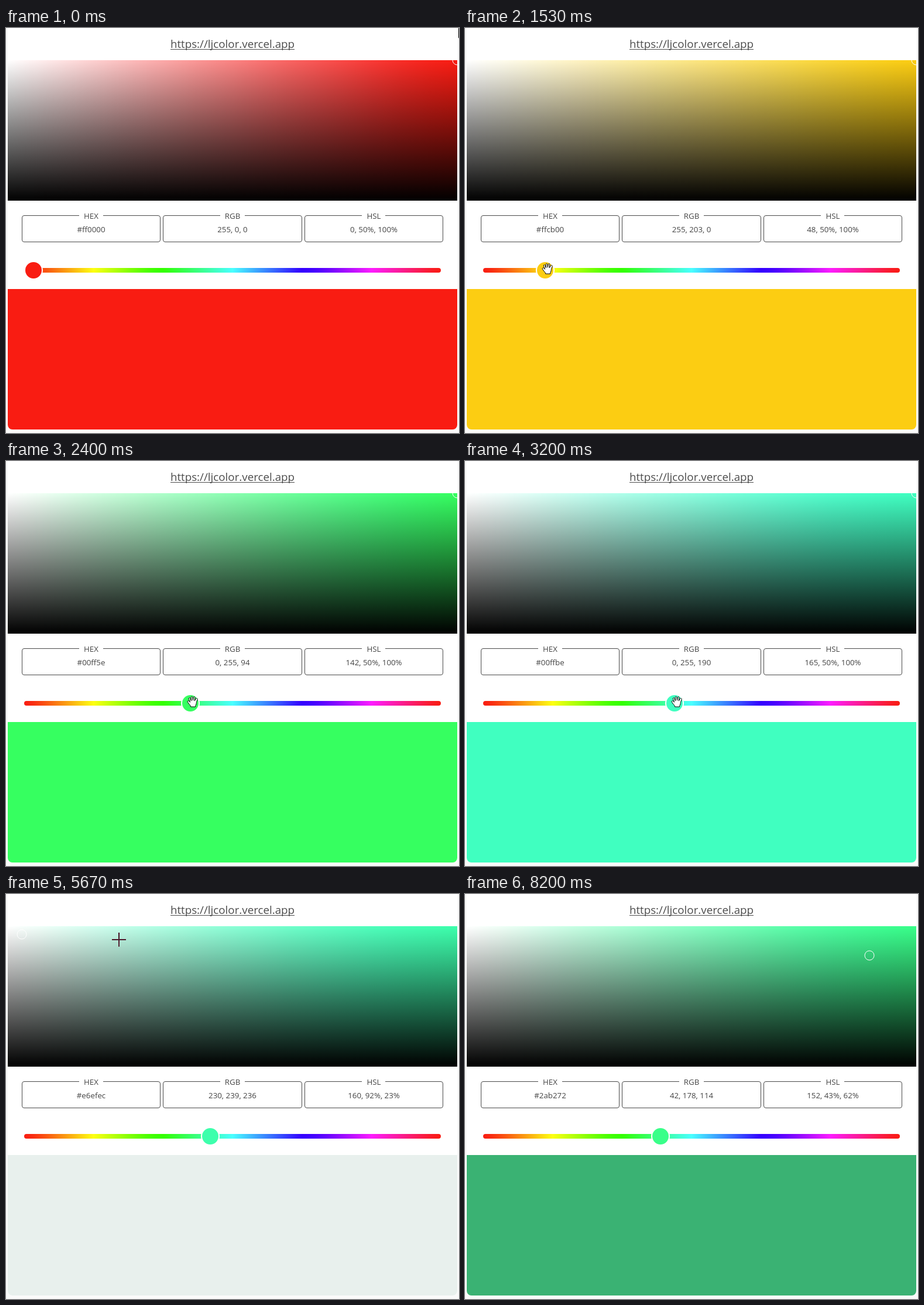
Recreate the animation shown at these times as an HTML page. Size 774 by 692 pixels, loop 9270 ms.

```html
<!DOCTYPE html>
<html lang="en">
<head>
<meta charset="utf-8">
<title>Color picker</title>
<style>
  html, body { margin: 0; width: 100%; height: 100%; overflow: hidden; background: #fafafa; }
  svg { display: block; width: 774px; height: 692px; isolation: isolate; }
  text { font: 13.3px "Open Sans", "Noto Sans", sans-serif; fill: #444; text-anchor: middle; }
  .title { font-size: 18.75px; fill: #4c4c4c; }
  .box { fill: none; stroke: #4a4a4a; }
  .cursor { fill: #fff; stroke: #000; stroke-linejoin: round; }
  #cross { fill: #fff; mix-blend-mode: difference; }
</style>
</head>
<body>
<svg viewBox="0 0 774 692">
  <defs>
    <linearGradient id="sat"></linearGradient>
    <linearGradient id="dark" x2="0" y2="1"><stop stop-opacity="0"/><stop offset="1"/></linearGradient>
    <linearGradient id="rainbow"></linearGradient>
    <clipPath id="area"><rect x="3" y="55" width="768" height="240"/></clipPath>
  </defs>
  <rect width="774" height="692" fill="#fafafa"/>
  <path d="M3 0H771V678a8 8 0 0 1 -8 8H11a8 8 0 0 1 -8 -8Z" fill="#fff"/>
  <text class="title" x="387" y="34">https://ljcolor.vercel.app</text>
  <rect x="281" y="36" width="212" height="1" fill="#4c4c4c"/>
  <rect x="3" y="55" width="768" height="240" fill="url(#sat)"/>
  <rect x="3" y="55" width="768" height="240" fill="url(#dark)"/>
  <g clip-path="url(#area)"><circle id="marker" r="8" fill="none" stroke="#fff"/></g>
  <g id="fields"></g>
  <rect x="31" y="410" width="712" height="8" rx="4" fill="url(#rainbow)"/>
  <circle id="thumb" cy="414" r="15" stroke="#fff" stroke-width="2"/>
  <path id="preview" d="M3 446H771V678a8 8 0 0 1 -8 8H11a8 8 0 0 1 -8 -8Z"/>
  <path id="cross" d="M-1 -12H1V-1H12V1H1V12H-1V1H-12V-1H-1Z"/>
  <path id="arrow" class="cursor" d="M.5 .5V16.8L4.3 13.2L6.8 18.6L9.2 17.6L6.8 12.2H12Z"/>
  <path id="hand" class="cursor" d="M-3.5 9V7.5C-5 5.5 -7.5 3 -8.8 .5C-9 -1.5 -7 -1.8 -5.5 0L-4.4 1.2L-6.6 -4.8
    C-6.8 -6.8 -4.8 -7 -4.2 -5.4L-2.6 -1.2L-2.8 -7.2C-2.6 -9 -.4 -9 -.2 -7.2L.4 -1.8L1.4 -7.4C2 -9 4 -8.6 3.8 -6.8
    L3.2 -1L5.4 -4.8C6.6 -6.4 8.8 -5.4 8 -3.4L6.4 1.4C6.2 4.2 5.4 6 4.6 7.5V9Z"/>
</svg>
<script>
const LOOP = 9270, STEP = 200 / 3;
const DRAG_START = 1000, DRAG_END = 3500, LEAVE = 8195;

const el = id => document.getElementById(id);
const clamp = v => Math.min(1, Math.max(0, v));
const smooth = p => p * p * (3 - 2 * p);
const thumbX = h => 47 + h * 680 / 360;

// time, hue while the slider is dragged
const hueKeys = [[1000, 0], [1200, 5.9], [1400, 28], [1866, 97], [2400, 142.1], [2860, 161], [3400, 167]];

// start, end, x, y of each free pointer move, before and after the drag
const approach = [[0, 933, 49, 410]];
const moves = [
  [3533, 4400, 68, 94],
  [4467, 4733, 27, 69],
  [5200, 5666, 193, 78],
  [5933, 6266, 360, 86],
  [6533, 6800, 530, 95],
  [7000, 7266, 691, 105],
  [7733, LEAVE, 776, 670]
];

// time, x, y, hue, saturation, value of each click in the area
const picks = [
  [5130, 27, 69, 160, 0.0401, 0.938],
  [5930, 193, 78, 158, 0.22, 0.877],
  [6530, 360, 86, 156, 0.4, 0.824],
  [7000, 530, 95, 154, 0.59, 0.763],
  [7465, 691, 105, 151.8, 0.764, 0.698]
];

function hsvToRgb(h, s, v) {
  return [5, 3, 1].map(n => {
    const k = (n + h / 60) % 6;
    return 255 * v * (1 - s * clamp(Math.min(k, 4 - k)));
  });
}

// screen colour profile, mixed in linear light
function screenColor(rgb) {
  const [r, g, b] = rgb.map(c => (c /= 255) <= 0.04045 ? c / 12.92 : ((c + 0.055) / 1.055) ** 2.4);
  const mixed = [0.95 * r + 0.033 * g + 0.034 * b, 0.0116 * r + g, 0.006 * r + b * (1 + 0.04 * g * (1 - b))];
  const out = mixed.map(c => {
    c = clamp(c);
    return Math.round(255 * (c <= 0.0031308 ? c * 12.92 : 1.055 * c ** (1 / 2.4) - 0.055));
  });
  return `rgb(${out})`;
}

// the profile bends every blend, so gradients get many stops
function addStops(id, count) {
  el(id).innerHTML = Array.from({ length: count + 1 }, (_, i) => `<stop offset="${i / count}"/>`).join("");
}

function paintStops(id, rgbAt) {
  const stops = el(id).children, last = stops.length - 1;
  for (let i = 0; i <= last; i++) stops[i].setAttribute("stop-color", screenColor(rgbAt(i / last)));
}

function hslText(rgb, h) {
  const max = Math.max(...rgb) / 255, min = Math.min(...rgb) / 255;
  const l = (max + min) / 2;
  const s = (max - min) / (1 - Math.abs(2 * l - 1));
  return `${Math.round(h)}, ${Math.round(l * 100)}%, ${Math.round(s * 100)}%`;
}

function dragHue(t) {
  let [t0, h0] = hueKeys[0];
  for (const [t1, h1] of hueKeys.slice(1)) {
    if (t < t1) return h0 + (h1 - h0) * clamp((t - t0) / (t1 - t0));
    [t0, h0] = [t1, h1];
  }
  return h0;
}

function follow(list, t, x, y) {
  for (const [start, end, toX, toY] of list) {
    const p = smooth(clamp((t - start) / (end - start)));
    x += (toX - x) * p;
    y += (toY - y) * p;
  }
  return [x, y];
}

function pointer(t) {
  if (t < DRAG_START) return follow(approach, t, 773, 0);
  const grip = 2 + 2 * clamp((t - 1200) / 400);
  return follow(moves, t, thumbX(dragHue(t)) + grip, 411);
}

function place(id, x, y, shown) {
  el(id).setAttribute("transform", `translate(${x.toFixed(0)} ${y.toFixed(0)})`);
  el(id).setAttribute("visibility", shown ? "visible" : "hidden");
}

function draw(time) {
  const t = Math.floor((time + 4) / STEP) * STEP;
  let mx = 771, my = 55, h = dragHue(t), s = 1, v = 1;
  for (const p of picks) if (t + 4 >= p[0]) [, mx, my, h, s, v] = p;

  const rgb = hsvToRgb(h, s, v), whole = rgb.map(Math.round);
  paintStops("sat", p => hsvToRgb(h, p, 1));
  el("thumb").setAttribute("fill", screenColor(hsvToRgb(h, 1, 1)));
  el("thumb").setAttribute("cx", thumbX(h).toFixed(0));
  el("preview").setAttribute("fill", screenColor(rgb));
  el("marker").setAttribute("cx", mx);
  el("marker").setAttribute("cy", my);
  el("HEX").textContent = "#" + whole.map(c => c.toString(16).padStart(2, "0")).join("");
  el("RGB").textContent = whole.join(", ");
  el("HSL").textContent = hslText(rgb, h);

  const [x, y] = pointer(t);
  const here = t < LEAVE;
  const inArea = x < 771 && y >= 55 && y < 295;
  const dragging = t >= DRAG_START && t < DRAG_END;
  const onThumb = dragging || Math.hypot(x - thumbX(h), y - 414) < 16;
  place("cross", x, y, here && inArea);
  place("hand", x, y, here && onThumb);
  place("arrow", x, y, here && !inArea && !onThumb);
}

addStops("sat", 16);
addStops("rainbow", 48);
paintStops("rainbow", p => hsvToRgb(p * 360, 1, 1));

el("fields").innerHTML = [["HEX", 27.5, 236, 125, 41], ["RGB", 268.5, 237, 366, 42], ["HSL", 510.5, 236, 608, 40]]
  .map(([name, x, w, gapX, gapW]) => `
    <rect class="box" x="${x}" y="320.5" width="${w}" height="45" rx="3.5"/>
    <rect x="${gapX}" y="318" width="${gapW}" height="5" fill="#fff"/>
    <text x="${x + w / 2}" y="326">${name}</text>
    <text id="${name}" x="${x + w / 2}" y="349"></text>`).join("");

const began = performance.now();
function tick() {
  draw((performance.now() - began) % LOOP);
  requestAnimationFrame(tick);
}
tick();
</script>
</body>
</html>
```
